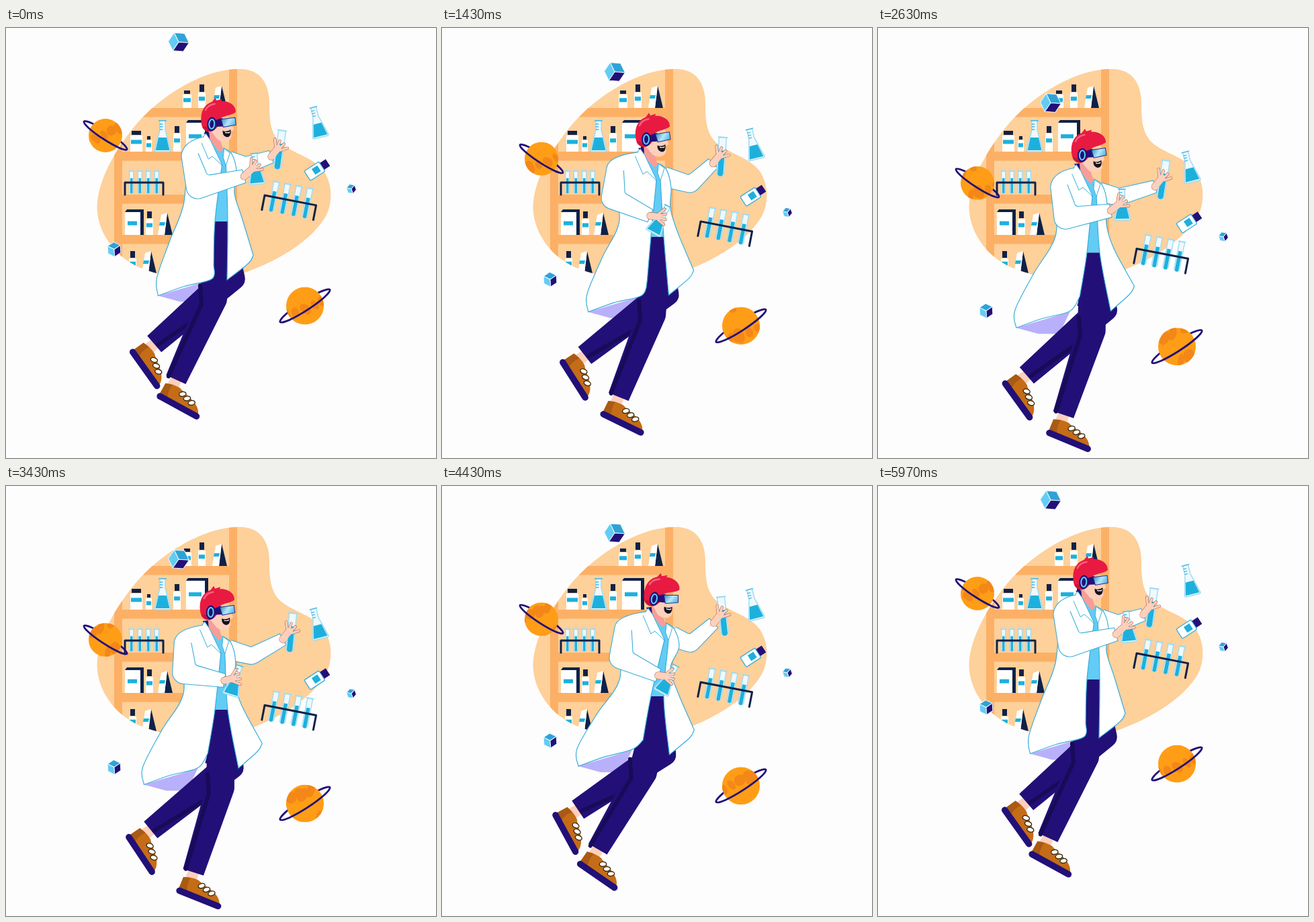
These frames come from a looping animation (640x640 px, 6.01 s). An HTML page with a canvas:

```html
<!DOCTYPE html>
<html lang="en">
<head>
<meta charset="utf-8">
<title>Floating lab</title>
<style>
html, body { margin: 0; width: 100%; height: 100%; overflow: hidden; background: #fdfdfd; }
canvas { display: block; width: 640px; height: 640px; }
</style>
</head>
<body>
<canvas id="stage" width="640" height="640"></canvas>
<script>
const ctx = document.getElementById('stage').getContext('2d');
const LOOP = 6010, END = 5970, TOP = 2975, SWAY = 48, RAD = Math.PI / 180;
const PAPER = '#fdfdfd', WALL = '#fed09a', WOOD = '#fcb066', BLUE = '#1eb0dc', CYAN = '#62ccf5', GLASS = '#9fdcf4',
  NAVY = '#221078', SHADE = '#180b58', INK = '#0f2148', LINE = '#3aaedb', SKIN = '#fdd0bc', WHITE = '#ffffff';

// Motion rules
const ease = u => u * u * (3 - 2 * u);
const bob = t => t < TOP ? ease(t / TOP) : 1 - ease((t - TOP) / (END - TOP));
const wave = (t, lag = 0) => Math.cos(2 * Math.PI * t / END - lag * RAD);
const bump = (c, power) => ((1 + c) / 2) ** power;
const leanAt = t => bump(wave(t, 292), 5);
const raiseAt = t => bump(wave(2 * t, -14), 3);

// Geometry helpers
const add = (p, x, y) => [p[0] + x, p[1] + y];
const mix = (a, b, u) => [a[0] + (b[0] - a[0]) * u, a[1] + (b[1] - a[1]) * u];
function place([x, y], deg, lx, ly) {
  const c = Math.cos(deg * RAD), s = Math.sin(deg * RAD);
  return [x + lx * c - ly * s, y + lx * s + ly * c];
}

// Drawing helpers
function ink(fill, stroke, width = 1.2) {
  if (fill) { ctx.fillStyle = fill; ctx.fill(); }
  if (stroke) { ctx.strokeStyle = stroke; ctx.lineWidth = width; ctx.stroke(); }
}
function rect(x, y, w, h, fill) { ctx.fillStyle = fill; ctx.fillRect(x, y, w, h); }
function poly(pts, fill, stroke, width) {
  ctx.beginPath();
  pts.forEach(p => ctx.lineTo(...p));
  ctx.closePath();
  ink(fill, stroke, width);
}
function line(pts, color, width) {
  ctx.beginPath();
  pts.forEach(p => ctx.lineTo(...p));
  ink(null, color, width);
}
function shape(d, fill, stroke, width = 1) {
  const p = new Path2D(d);
  if (fill) { ctx.fillStyle = fill; ctx.fill(p); }
  if (stroke) { ctx.strokeStyle = stroke; ctx.lineWidth = width; ctx.stroke(p); }
}
function oval(x, y, rx, ry, rot, fill, stroke, width) {
  ctx.beginPath();
  ctx.ellipse(x, y, rx, ry, rot, 0, 7);
  ink(fill, stroke, width);
}
function at(x, y, deg, draw) {
  ctx.save();
  ctx.translate(x, y);
  ctx.rotate(deg * RAD);
  draw();
  ctx.restore();
}
// Catmull-Rom curve continuing the current path
function curve(pts) {
  ctx.lineTo(...pts[0]);
  for (let i = 0; i < pts.length - 1; i++) {
    const a = pts[i - 1] || pts[i], b = pts[i], c = pts[i + 1], d = pts[i + 2] || c;
    ctx.bezierCurveTo(b[0] + (c[0] - a[0]) / 6, b[1] + (c[1] - a[1]) / 6,
      c[0] - (d[0] - b[0]) / 6, c[1] - (d[1] - b[1]) / 6, ...c);
  }
}
// Bent tapered limb; side 1 or -1 chooses the outer side of the bend.
function limb([a, b, c], [wa, wb, wc], side, fill, stroke, from) {
  const normal = (p, q) => {
    const x = q[0] - p[0], y = q[1] - p[1], l = Math.hypot(x, y) || 1;
    return [-y / l * side, x / l * side];
  };
  const n = normal(a, b), m = normal(b, c);
  const len = Math.hypot(n[0] + m[0], n[1] + m[1]) || 1;
  const mid = [(n[0] + m[0]) / len, (n[1] + m[1]) / len];
  const w = wb / Math.max(0.6, n[0] * mid[0] + n[1] * mid[1]);
  const off = (p, v, k) => [p[0] + v[0] * k, p[1] + v[1] * k];
  const start = off(a, n, wa), end = off(c, m, wc);
  ctx.beginPath();
  if (from) {
    ctx.moveTo(...from);
    ctx.quadraticCurveTo(a[0] - 14, a[1] - 20, ...start);
  } else ctx.moveTo(...start);
  ctx.arcTo(...off(b, mid, w), ...end, 17);
  ctx.lineTo(...end);
  ctx.lineTo(...off(c, m, -wc));
  ctx.arcTo(...off(b, mid, -w), ...off(a, n, -wa), 5);
  ctx.lineTo(...off(a, n, from ? -wa * 0.5 : -wa));
  ink(fill, stroke, 1.1);
}

// Lab ware
function flask(x, y, deg) {
  at(x, y, deg, () => {
    shape('M-4 0H4V14L12 44Q12 46 10 46H-10Q-12 46-12 44L-4 14Z', '#eef9fe', GLASS, 1.5);
    shape('M-6 25H6L10.5 44H-10.5Z', BLUE);
    shape('M-5.5 0H5.5M-4 5H0M-4 9H0M-4 13H0', null, '#45b9e4', 1.3);
  });
}
function tube(w, h, full) {
  const bar = (y, k, fill, stroke) => {
    ctx.beginPath();
    ctx.roundRect(-k / 2, y, k, h - y, [0, 0, k / 2, k / 2]);
    ink(fill, stroke, 1.4);
  };
  bar(0, w, '#eef9fe', GLASS);
  bar(h * full, w - 2.5, BLUE);
  line([[-w / 2 - 1, 0], [w / 2 + 1, 0]], GLASS, 2);
}
function rack(x, y, deg, width, leg, gap, w, up, down) {
  at(x, y, deg, () => {
    for (let i = -1.5; i < 2; i++) at(width / 2 + i * gap, -up, 0, () => tube(w, up + down, 0.32));
    line([[0, leg], [0, 0], [width, 0], [width, leg]], INK, 3);
  });
}
function bottle(x, floor, w, h, capH) {
  const y = floor - h;
  rect(x + 2, y, w - 4, capH, INK);
  rect(x, y + capH + 1, w, h - capH - 1, WHITE);
  rect(x + 1, y + capH + (h - capH) * 0.3, w - 2, 6, BLUE);
}
function box(x, floor, w, h) {
  const y = floor - h;
  poly([[x + 3, y - 4], [x + w + 5, y - 4], [x + w + 5, floor], [x + w, floor], [x, y]], INK);
  rect(x, y, w, h, WHITE);
  rect(x + 4, y + h * 0.4, w - 9, 6, BLUE);
}
function wedge(x, floor) {
  at(x, floor - 33, 0, () => {
    shape('M0 0L8 33H-4Z', INK);
    shape('M-9 3L0 0L-4 33H-14Z', WHITE);
    shape('M-11 14H-3L-4 19H-12Z', BLUE);
  });
}

const BLOB = new Path2D('M348 61C378 61 392 82 392 112C392 140 394 160 412 174C432 188 458 194 472 212' +
  'C487 232 486 262 476 280C458 312 412 345 350 366C300 376 240 374 200 357C165 342 140 310 136 275' +
  'C132 235 160 185 190 148C225 105 290 61 348 61Z');

function room() {
  ctx.save();
  ctx.clip(BLOB);
  rect(120, 50, 380, 330, WALL);
  rect(332, 50, 12, 320, WOOD);
  rect(161, 150, 12, 200, WOOD);
  const floors = [119, 184, 248, 308, 365];
  floors.forEach(y => rect(161, y, 176, 13.5, WOOD));
  const [a, b, c, d, e] = floors;
  bottle(263, a, 13, 26, 5);
  bottle(286, a, 11, 35, 11);
  wedge(321, a);
  bottle(185, b, 18, 31, 6);
  bottle(208, b, 9, 23, 5);
  flask(233, b - 46, 0);
  bottle(249, b, 11, 38, 10);
  box(268, b, 28, 43);
  rack(177, c - 18, 0, 57, 18, 12.5, 6, 17, 16);
  box(177, d, 23, 34);
  bottle(208, d, 11, 35, 10);
  wedge(240, d);
  bottle(183, e - 4, 11, 29, 10);
  wedge(216, e);
  ctx.restore();
}

// Floating things
function cube(x, y, r, deg) {
  at(x, y, deg, () => {
    const v = i => place([0, 0], i * 60 - 90, r, 0);
    [[5, '#2fa3d6'], [3, CYAN], [1, NAVY]].forEach(([i, color]) =>
      poly([[0, 0], v(i), v(i + 1), v(i + 2)], color, '#eaf6fd', 1));
  });
}
function planet(x, y, r, deg, rx, ry, t) {
  const ring = a => at(x, y, deg, () => {
    ctx.beginPath();
    ctx.ellipse(0, 0, rx, ry, 0, a, a + Math.PI);
    ink(null, NAVY, 2.8);
  });
  ring(Math.PI);
  ctx.save();
  ctx.beginPath();
  ctx.arc(x, y, r, 0, 7);
  ctx.clip();
  rect(x - r, y - r, 2 * r, 2 * r, '#ff9d16');
  const span = r * 4;
  for (let i = 0; i < 12; i++) {
    const px = (i * 0.37 + t / END) % 1 * span - span / 2;
    const py = (i * 0.618 % 1 - 0.5) * 1.7 * r;
    oval(x + px, y + py, r * (0.2 + i % 3 * 0.09), r * (0.16 + i % 4 * 0.05), i, '#f38718');
  }
  ctx.restore();
  ring(0);
}
function jar(x, y) {
  at(x, y, -33, () => {
    ctx.beginPath();
    ctx.roundRect(-15, -8.5, 26, 17, 2);
    ink(WHITE, LINE, 1.3);
    rect(-4, -5, 10, 10, BLUE);
    rect(11.5, -6, 10, 12, NAVY);
  });
}

// Character
function shoe([x, y], deg) {
  at(x, y, deg, () => {
    poly([[1, -38], [17, -36], [19, -20], [1, -20]], SKIN);
    shape('M-2 0V-21Q10-26 21-25C34-19 60-20 64 0Z', '#c56c17');
    shape('M-2 0V-21L8-24Q6-8 14 0Z', '#a95a14');
    for (let i = 0; i < 3; i++) oval(28 + i * 9, -19 + i * 2.5, 3.4, 5.2, 0.9, '#fffdf2', '#33240f', 1.3);
    line([[0, 0], [62, 0]], NAVY, 9.5);
  });
}
// The whole leg swings about the hip; knee and heel are offsets at rest.
function leg(hip, swing, knee, heel, sole, shaded) {
  const k = place(hip, swing, ...knee), h = place(hip, swing, ...heel), deg = sole + swing;
  const cuff = place(h, deg, 9, -33);
  shoe(h, deg);
  limb([hip, k, cuff], [20, 21, 16], -1, NAVY);
  if (shaded) line([add(k, -19, -20), add(k, -17, 8), add(cuff, -11, -5)], SHADE, 6);
  else line([add(k, -30, 46), place(cuff, deg, 4, -4)], SHADE, 6);
}
function hand(wrist, grip, hold) {
  const a = Math.atan2(grip[1] - wrist[1], grip[0] - wrist[0]) / RAD;
  const stroke = (pts, w) => { line(pts, '#b06a58', w + 1.2); line(pts, SKIN, w); };
  stroke([wrist, grip], 10);
  hold();
  for (let i = 0; i < 4; i++) {
    const base = place(grip, a, -5, (i - 1.5) * 3);
    stroke([base, place(base, a - 45 + i * 26, 11, 0)], 3.2);
  }
  line([wrist, place(grip, a, -4, 0)], SKIN, 9.5);
}
function face([x, y], deg) {
  at(x, y, deg, () => {
    ctx.translate(-305, -143);
    shape('M308 142H335L338 152L333 155L334 162C331 171 321 172 313 166L304 154Z', SKIN);
    shape('M321 153Q327 156 333 152Q334 163 327 163Q320 161 321 153Z', '#17121c');
    shape('M324 155Q328 157 332 154.5L331 157H325Z', WHITE);
    shape('M291 148C286 130 292 114 306 110L311 104L313 108L321 106L320 109C333 109 342 117 341 126' +
      'C334 131 326 130 319 134L313 148C306 156 296 157 291 148Z', '#e81a42');
    shape('M296 122Q300 114 310 113', null, '#f5607c', 2.5);
    shape('M291 146Q294 154 304 154L298 147Z', '#c3143c');
    poly([[308, 138], [321, 134], [322, 147], [309, 147]], NAVY);
    const g = ctx.createLinearGradient(319, 135, 340, 148);
    ['#2f86c4', '#b4e9fb', '#3fa9de'].forEach((c, i) => g.addColorStop(i / 2, c));
    poly([[319, 136], [340, 134], [341, 145], [322, 148]], g, '#2c2d86', 1);
    oval(305, 143, 7, 10.5, 0.1, NAVY);
    oval(305, 143, 4, 7, 0.1, NAVY, CYAN, 2);
  });
}
function person(t) {
  const drop = SWAY * bob(t), lean = leanAt(t), raise = raiseAt(t), sway = wave(t);
  const body = (x, y) => [x, y + drop];
  const head = body(304 + 15 * lean, 143);
  const up = (x, y) => add(head, x, y);

  // Far arm with the tube
  const elbow = [371 - 14 * raise, head[1] + 67 - 6 * raise];
  const wrist = [404 - 9 * sway, head[1] + 36 + 13 * raise];
  const grip = add(wrist, 13, -16), tilt = 4 - 13 * lean + 6 * raise;
  limb([up(27, 56), elbow, wrist], [15, 12.5, 9.5], 1, WHITE, LINE);
  hand(wrist, grip, () => at(...place(grip, tilt, 0, -23), tilt, () => tube(11, 58, 0.34)));

  // Coat corners
  const tip = body(217 + 12 * sway - 17 * lean, 400 - 10 * lean);
  const back = body(264, 264), corner = body(214 + 0.42 * tip[0], 353);
  const flap = body(375 - 7 * sway, 338), split = body(338 - 9 * sway, 375);
  const beltL = body(311, 288), beltR = body(330, 288);

  poly([tip, add(tip, 33, 9), add(tip, 64, 9), add(tip, 80, -24)], '#b9b0fb');
  leg(body(322, 313), 2.5 - 4 * raise + 5 * lean, [12, 59], [-135, 168], 55, false);
  leg(body(320, 313), 16 * lean - 6 + 3 * wave(t, 40), [-14, 90], [-96, 233], 30, true);
  poly([add(beltL, -5, 0), beltR, split, add(split, -8, 10), add(corner, -4, 14), corner], NAVY);
  poly([up(-2, 22), up(18, 36), up(26, 60), beltR, add(beltL, -2, 0), up(8, 60)], CYAN);

  ctx.beginPath();
  curve([up(18, 36), up(30, 45), up(37, 72), body(340, 246), body(351, 282), flap]);
  curve([flap, add(flap, -7, 12), split]);
  curve([split, beltR, up(21, 62), up(18, 36)]);
  ink(WHITE, LINE);

  const shoulder = up(-42 + 14 * raise, 45);
  ctx.beginPath();
  curve([up(-12, 18), add(shoulder, -6, 8), back, add(mix(tip, back, 0.45), 0, -20), add(tip, -2, -26), tip]);
  curve([tip, add(tip, 39, -14), add(tip, 80, -25), corner]);
  curve([corner, beltL, up(15, 62)]);
  ctx.lineTo(...up(-3, 22));
  ctx.closePath();
  ink(WHITE, LINE);

  poly([up(-4, 8), up(12, 22), up(17, 38), up(12, 42), up(-3, 25)], '#f79d98');
  poly([up(-12, 13), up(-4, 12), up(-3, 22), up(-7, 20)], NAVY);
  poly([up(-9, 14), up(-2, 24), up(16, 62), up(1, 48), up(-5, 52), up(-17, 24)], WHITE, LINE, 1);
  poly([up(18, 36), up(27, 43), up(21, 62), up(17, 50)], WHITE, LINE, 1);
  face(head, 11 * lean - 3);

  // Near arm with the flask, swinging between a low and a high pose
  const nearElbow = mix(up(-51, 89), up(-20, 97), raise);
  const nearWrist = mix(up(6, 114), up(50, 76), raise);
  const nearGrip = add(nearWrist, 17, 2 - 18 * raise), turn = 29 - 36 * raise;
  limb([shoulder, nearElbow, nearWrist], [17, 16, 10], 1, WHITE, LINE, up(-12, 19));
  hand(nearWrist, nearGrip, () => flask(...place(nearGrip, turn, 0, -19), turn));
}

function draw(t) {
  const b = bob(t);
  ctx.lineCap = ctx.lineJoin = 'round';
  rect(0, 0, 640, 640, PAPER);
  room();
  cube(257, 21 + 94 * b, 15.5, 34);
  planet(148, 160 + 73.5 * b, 25, 33, 38, 6, t);
  planet(445, 413.5 + 63 * b, 28, -33, 44, 7, t + 900);
  cube(161, 329.5 + 95 * b, 11, -4);
  cube(514, 239.5 + 74 * b, 7.5, -20);
  flask(457.5, 118 + 69 * b, -14);
  jar(461, 212 + 81 * b);
  rack(385, 249 + 82.5 * b, 11, 78, 22, 17, 8, 23, 22);
  person(t);
}

const start = performance.now();
function tick() {
  draw(Math.min((performance.now() - start) % LOOP, END));
  requestAnimationFrame(tick);
}
tick();
</script>
</body>
</html>
```
